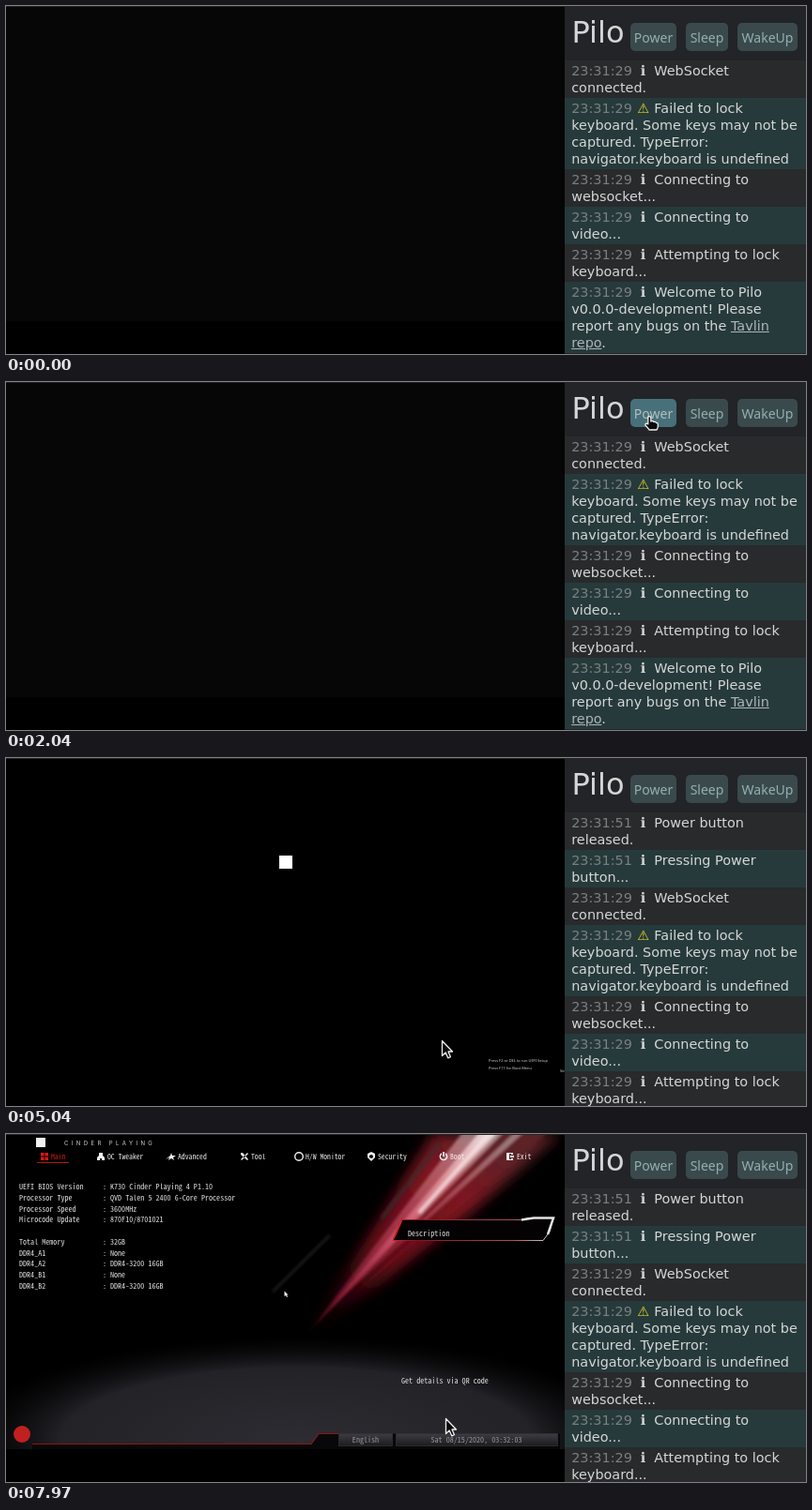
An HTML page for the animation above (8 s loop, 852 by 371 pixels).

```html
<!DOCTYPE html>
<html lang="en">
<head>
<meta charset="utf-8">
<title>Remote console</title>
<style>
  html, body { margin: 0; width: 100%; height: 100%; overflow: hidden; background: #000; }
  #stage { position: relative; width: 852px; height: 371px; overflow: hidden; background: #000; }
  svg { position: absolute; left: 0; top: 0; }
  aside {
    position: absolute; left: 595px; top: 0; width: 257px; height: 371px; overflow: hidden;
    background: #222427; color: #d6d6d6; font: 14.4px/18px "DejaVu Sans", sans-serif;
  }
  h1 { position: absolute; left: 7.5px; top: 8px; margin: 0; font: 32px/40px "DejaVu Sans", sans-serif; }
  .button {
    position: absolute; top: 18px; height: 30px; border-radius: 5px; background: #3a4a4c;
    color: #93b0b0; text-align: center; font: 14px/31px "Noto Sans", sans-serif;
  }
  .button.hover { background: #48707a; color: #b2bebe; }
  #log { position: absolute; top: 58px; width: 100%; white-space: nowrap; }
  .entry { padding: 2px 7.2px; background: #282a2c; }
  .entry.teal { background: #263a3b; }
  time { color: #7c7f80; }
  i { display: inline-block; width: 1em; text-align: center; font-style: normal; }
  .warn { color: #e8d820; }
  u { color: #b0b4b6; }
</style>
</head>
<body>
<div id="stage">
  <svg id="video" width="595" height="371">
    <defs>
      <clipPath id="screen"><rect y="1" width="595" height="335"/></clipPath>
      <filter id="soft" x="-50%" y="-50%" width="200%" height="200%"><feGaussianBlur stdDeviation="7"/></filter>
      <filter id="fine" x="-50%" y="-50%" width="200%" height="200%"><feGaussianBlur stdDeviation="1.8"/></filter>
      <linearGradient id="beam" gradientUnits="userSpaceOnUse" x1="315" y1="218" x2="520" y2="0">
        <stop offset="0" stop-color="#50081a" stop-opacity="0"/>
        <stop offset=".2" stop-color="#8c1c34"/>
        <stop offset=".5" stop-color="#cc5068"/>
        <stop offset=".75" stop-color="#dc8c94"/>
        <stop offset="1" stop-color="#e8dcdc"/>
      </linearGradient>
      <linearGradient id="haze" gradientUnits="userSpaceOnUse" x1="320" y1="215" x2="520" y2="0">
        <stop offset="0" stop-color="#30040c" stop-opacity="0"/>
        <stop offset=".4" stop-color="#640c18"/>
        <stop offset=".75" stop-color="#7c1420"/>
        <stop offset="1" stop-color="#5c2428"/>
      </linearGradient>
      <radialGradient id="floor">
        <stop offset="0" stop-color="#2c2c32"/>
        <stop offset=".7" stop-color="#222227"/>
        <stop offset="1" stop-color="#0c0c0e" stop-opacity="0"/>
      </radialGradient>
      <linearGradient id="rim">
        <stop offset="0" stop-color="#d02420"/>
        <stop offset=".15" stop-color="#801418"/>
        <stop offset=".75" stop-color="#a85058"/>
        <stop offset="1" stop-color="#dcdcdc"/>
      </linearGradient>
      <linearGradient id="bar" x2="0" y2="1">
        <stop offset="0" stop-color="#3c3c42"/>
        <stop offset="1" stop-color="#1c1c20"/>
      </linearGradient>
    </defs>
    <rect width="595" height="1" fill="#222426"/>
    <rect id="idle" y="1" width="595" height="335" fill="#060606"/>
    <g id="splash" fill="#d4d4d4" font-family="Noto Sans, sans-serif" font-size="4">
      <rect x="291" y="104" width="14" height="14" fill="#fff"/>
      <text x="514" y="324">Press F2 or DEL to run UEFI Setup</text>
      <text x="514" y="332">Press F11 for Boot Menu</text>
      <text x="590" y="335">Version</text>
    </g>
    <g id="bios" clip-path="url(#screen)"></g>
  </svg>
  <aside>
    <h1>Pilo</h1>
    <div class="button" id="power" style="left:70px;width:49px">Power</div>
    <div class="button" style="left:129px;width:45px">Sleep</div>
    <div class="button" style="left:184px;width:64px">WakeUp</div>
    <div id="log"></div>
  </aside>
  <svg width="852" height="371">
    <g id="pointer" fill="#0a0a0c" stroke="#f0f0f0" stroke-width="1.3" stroke-linejoin="round">
      <path id="arrow" d="M.5.5V16.5L4.2 13 6.7 18.8 9.4 17.6 7 12H11.5Z"/>
      <path id="hand" d="M-1.2 8V1.2Q-1-.3.3-.3T1.8 1.2V5Q4.2 4 5 5.6 7 5 7.5 6.6 9.2 6.2 9.3 8V10.5Q9 12.5 8 14H0Q-1.5 11.5-4 9.2-4.3 7.4-2.8 7.2Z"/>
    </g>
  </svg>
</div>
<script>
const LOOP = 8000;
const $ = id => document.getElementById(id);
const show = (id, on) => { $(id).style.display = on ? '' : 'none'; };

// Font size at which one character of the narrow mono face advances by `pitch` pixels.
const MONO = '"Noto Sans Mono CJK JP", "Liberation Mono", monospace';
const ruler = document.createElement('canvas').getContext('2d');
ruler.font = `100px ${MONO}`;
const sizeFor = pitch => pitch * 100 / ruler.measureText('0').width;
const label = (text, x, y, { pitch = 4.04, fill = '#e4e4e4', extra = '' } = {}) =>
  `<text x="${x}" y="${y}" font-size="${sizeFor(pitch)}" fill="${fill}" ${extra}>${text}</text>`;

const facts = [
  ['UEFI BIOS Version', 'K730 Cinder Playing 4 P1.10'],
  ['Processor Type', 'QVD Talen 5 2400 6-Core Processor'],
  ['Processor Speed', '3600MHz'],
  ['Microcode Update', '870F10/8701021'],
  null,
  ['Total Memory', '32GB'],
  ['DDR4_A1', 'None'],
  ['DDR4_A2', 'DDR4-3200 16GB'],
  ['DDR4_B1', 'None'],
  ['DDR4_B2', 'DDR4-3200 16GB'],
];
const factRows = facts.map((fact, i) => {
  if (!fact) return '';
  const y = 59 + i * 11.75;
  return label(fact[0], 14, y) + label(':', 103, y) + label(fact[1], 111, y);
}).join('');

// Tab name, text x, icon path drawn around its own centre.
const tabs = [
  ['Main', 48, 'M-4-4H-.4V-.4H-4ZM.4-4H4V-.4H.4ZM-4 .4H-.4V4H-4ZM.4 .4H4V4H.4Z'],
  ['OC Tweaker', 108, 'M-2-4H2V-1L4 1V4H1V2H-1V4H-4V1L-2-1Z'],
  ['Advanced', 183, 'M-6 3L-1-1 0-4 1-1H5L2 1 3 4 0 2-3 4-2 1Z'],
  ['Tool', 261, 'M-4-4L-2-4 4 3 3 4-4-2ZM3-4L4-3-3 4-4 3Z'],
  ['H/W Monitor', 319, 'M-5 0A5 5 0 1 0 5 0 5 5 0 1 0-5 0ZM-3.6 0A3.6 3.6 0 1 1 3.6 0 3.6 3.6 0 1 1-3.6 0Z'],
  ['Security', 396, 'M0-5L4-3V1L0 5-4 1V-3ZM0-2L2-1V1L0 2-2 1V-1Z'],
  ['Boot', 473, 'M-1-5H1V0H-1ZM-2-4A4.4 4.4 0 1 0 2-4V-2A2.8 2.8 0 1 1-2-2Z'],
  ['Exit', 544, 'M-4-4H3V-2H1V-3H-1V3H1V2H3V4H-4ZM0-1H4V1H0Z'],
];
const tabRow = tabs.map(([name, x, icon], i) => {
  const fill = i ? '#f0f0f0' : '#d81818';
  return `<path d="${icon}" fill="${fill}" fill-rule="evenodd" transform="translate(${x - 7} 24)"/>` +
    label(name, x, 27, { pitch: 3.85, fill });
}).join('');

const ray = (x1, y1, x2, y2, width, stroke, opacity = 1) =>
  `<path d="M${x1} ${y1}L${x2} ${y2}" stroke="${stroke}" stroke-width="${width}" opacity="${opacity}"/>`;
// A shaft of light that widens from a point to a stretch of the top edge.
const shaft = (x, y, left, right, fill, opacity = 1) =>
  `<path d="M${x} ${y}L${left} -4H${right}Z" fill="${fill}" opacity="${opacity}"/>`;
const panel = (x, width) =>
  `<rect x="${x}" y="319.5" width="${width}" height="13" fill="url(#bar)" stroke="#34343a" stroke-width=".7"/>`;
const muted = { fill: '#96969c', extra: 'text-anchor="middle"' };

$('bios').setAttribute('font-family', MONO.replace(/"/g, "'"));
$('bios').innerHTML = `
  <rect width="595" height="336"/>
  <ellipse cx="310" cy="326" rx="360" ry="110" fill="url(#floor)"/>
  <g id="streak">
    <path d="M316 218L395 95 455 0H590L500 80 400 160Z" fill="url(#haze)" filter="url(#soft)"/>
    <g filter="url(#fine)">
      ${ray(284, 168, 345, 108, 3, '#24201e', .8)}
      ${ray(400, 90, 462, 10, 5, '#383030', .6)}
      ${shaft(335, 195, 528, 562, 'url(#haze)')}
      ${shaft(360, 180, 560, 580, 'url(#haze)')}
      ${shaft(318, 216, 488, 532, 'url(#beam)', .55)}
      ${shaft(320, 214, 506, 526, 'url(#beam)')}
      ${shaft(350, 180, 544, 554, 'url(#beam)', .45)}
      ${ray(440, 84, 518, -4, 4, '#f8e8e8', .75)}
    </g>
  </g>
  <rect x="32" y="4" width="10" height="10" fill="#f0f0f0"/>
  <text x="62" y="12" font-family="Inter, sans-serif" font-size="6" letter-spacing="3.4" fill="#d0d0d0">CINDER PLAYING</text>
  <path d="M33 30.5H67" stroke="#b81414"/>
  ${tabRow}${factRows}
  <path d="M422 91.5H549L556 89.5H583L579 104 572 113.5H412Z" fill="#040203" stroke="url(#rim)"/>
  <path d="M549 91.5L562 89.5H583L577 107" fill="none" stroke="#e4e4e4" stroke-width="2.4"/>
  <path d="M421 93L413 111" stroke="#d82420" stroke-width="1.8"/>
  ${label('Description', 428, 109)}
  ${label('Get details via QR code', 421, 266)}
  <path d="M28 331H325L334 319.5H590V336H28Z" fill="#08080a"/>
  <path d="M28 330.5H325L333 319.5H354" fill="none" stroke="#901414" stroke-width="1.2"/>
  <circle cx="17" cy="320" r="9" fill="#c02020"/>
  ${panel(354.5, 57)}${panel(415.5, 172)}
  ${label('English', 383, 329.3, muted)}
  ${label('', 501, 329.3, { ...muted, extra: muted.extra + ' id="clock"' })}
  <path d="M296.5 167.5V173L298 172 299 174 300 173.5 299 171.5H300.5Z" fill="#f4f4f4"/>`;

const info = '<i>ℹ</i>';
const start = '23:31:29', pressed = '23:31:51';
// Newest first: [time, lines, icon].
const entries = [
  [pressed, 'Power button<br>released.'],
  [pressed, 'Pressing Power<br>button...'],
  [start, 'WebSocket<br>connected.'],
  [start, 'Failed to lock<br>keyboard. Some keys may not be<br>captured. TypeError:<br>navigator.keyboard is undefined', '<i class="warn">⚠</i>'],
  [start, 'Connecting to<br>websocket...'],
  [start, 'Connecting to<br>video...'],
  [start, 'Attempting to lock<br>keyboard...'],
  [start, 'Welcome to Pilo<br>v0.0.0-development! Please<br>report any bugs on the <u>Tavlin<br>repo</u>.'],
];
let hiddenEntries = -1;
function renderLog(hidden) {
  if (hidden === hiddenEntries) return;
  hiddenEntries = hidden;
  $('log').innerHTML = entries.slice(hidden).map(([time, text, icon = info], i) =>
    `<div class="entry${i % 2 ? ' teal' : ''}"><time>${time}</time> ${icon} ${text}</div>`).join('');
}

// Pointer path: [ms, x, y].
const path = [
  [250, 96, 378], [600, 127, 333], [760, 127, 333], [1550, 685, 37], [2650, 685, 37],
  [3180, 543, 173], [3300, 543, 173], [3900, 464, 301], [5500, 464, 301], [5800, 468, 300],
  [6700, 468, 300], [7000, 468, 303], [LOOP, 468, 303],
];
const ease = p => p * p * (3 - 2 * p);
function pointerAt(t) {
  const next = path.findIndex(([ms]) => ms > t);
  if (next < 1) return path[0].slice(1);
  const [t0, x0, y0] = path[next - 1], [t1, x1, y1] = path[next];
  const p = ease((t - t0) / (t1 - t0));
  return [x0 + (x1 - x0) * p, y0 + (y1 - y0) * p];
}

function render(t) {
  const [x, y] = pointerAt(t);
  const hover = x >= 665 && x <= 714 && y >= 18 && y <= 48;
  $('pointer').setAttribute('transform', `translate(${Math.round(x)} ${Math.round(y)})`);
  show('arrow', !hover);
  show('hand', hover);
  $('power').classList.toggle('hover', hover);

  renderLog(t < 2200 ? 2 : t < 2480 ? 1 : 0);

  show('idle', t < 4300);
  show('splash', t >= 4650 && t < 5650);
  show('bios', t >= 6000);
  $('clock').textContent = `Sat 08/15/2020, 03:32:0${t < 7250 ? 2 : 3}`;
}

const origin = performance.now();
function tick() {
  render((performance.now() - origin) % LOOP);
  requestAnimationFrame(tick);
}
tick();
</script>
</body>
</html>
```
